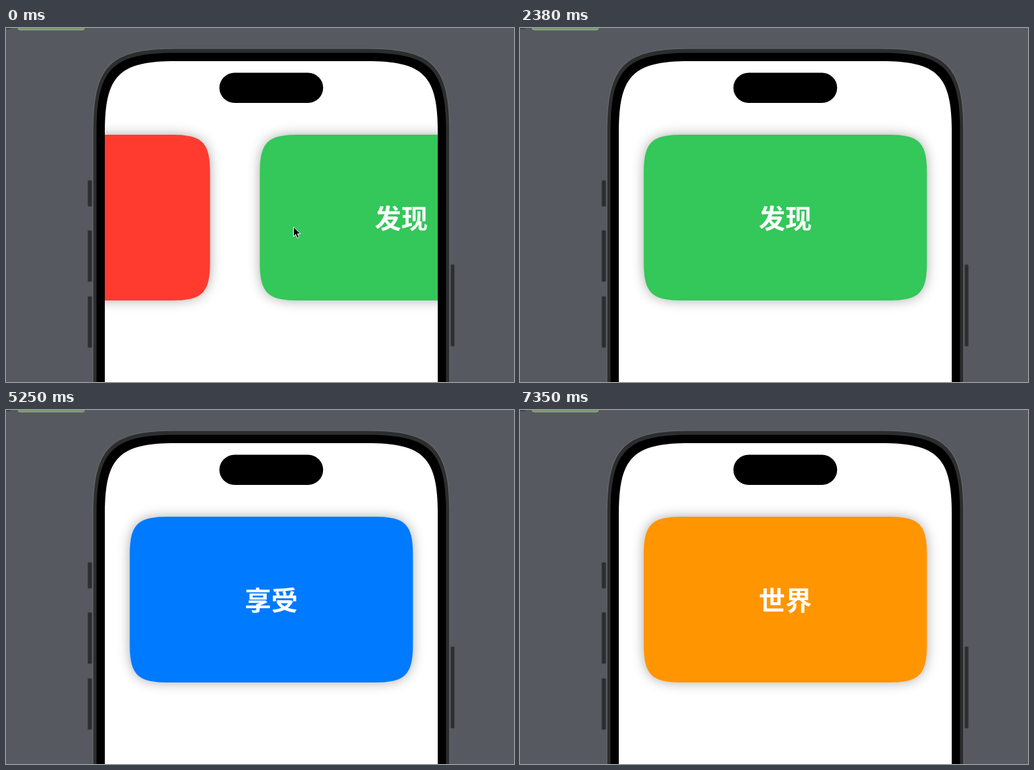
An HTML page for the animation above (8 s loop, 766 by 534 pixels).

```html
<!DOCTYPE html>
<html lang="zh-CN">
<head>
<meta charset="utf-8">
<style>
  html, body { margin: 0; width: 100%; height: 100%; overflow: hidden; background: #565a60; }
  svg { display: block; }
  .card path { filter: drop-shadow(0 0 9px rgba(0, 0, 0, .33)); }
  .card text { font: 700 40px "Noto Sans CJK SC", "Noto Sans CJK", "Noto Sans SC", sans-serif; fill: #fff; text-anchor: middle; }
</style>
</head>
<body>
<svg width="766" height="534" viewBox="0 0 766 534">
  <defs><clipPath id="screen"><path id="clip"/></clipPath></defs>
  <rect x="-4" y="-4" width="12" height="5.5" rx="2" fill="#35393c"/>
  <rect x="18.5" y="-8" width="99.5" height="11" rx="2.5" fill="#789a6c" stroke="#a3b99b" stroke-width=".8"/>
  <g fill="#2b2d2f" stroke="#3b3e41" stroke-width=".8">
    <rect x="123.4" y="230" width="6" height="39" rx="1"/>
    <rect x="123.4" y="305.5" width="6" height="77" rx="1"/>
    <rect x="123.4" y="405" width="6" height="77" rx="1"/>
    <rect x="670.8" y="357" width="5.2" height="123" rx="1"/>
  </g>
  <path id="frame" fill="#2c2d2e" stroke="#66696b" stroke-width="1.2"/>
  <path id="bezel"/>
  <path id="glass" fill="#fff"/>
  <g clip-path="url(#screen)"><g id="strip"></g></g>
  <rect x="321.8" y="67.5" width="156.4" height="45.5" rx="22.75"/>
  <path id="cursor" d="M433.5 300v14.5l3.3-3.1 2.4 5.5 2.7-1.1-2.4-5.4h4.6z" stroke="#fff" stroke-width="1"/>
</svg>
<script>
const LOOP = 8000, STEP = 70, PITCH = 502, RESET = 1190;
const OMEGA = 2 * Math.PI / 0.4;
const STARTS = [1962, 3984, 6081];
const CARDS = [['欢迎', '#ff3b30'], ['发现', '#34c759'], ['享受', '#007aff'], ['世界', '#ff9500']];
const $ = id => document.getElementById(id);

// Rectangle with continuous corners that reach e along each side
function squircle(x, y, w, h, e) {
  const k = e * 0.2, r = x + w, b = y + h;
  return `M${x + e} ${y}H${r - e}C${r - k} ${y} ${r} ${y + k} ${r} ${y + e}` +
    `V${b - e}C${r} ${b - k} ${r - k} ${b} ${r - e} ${b}` +
    `H${x + e}C${x + k} ${b} ${x} ${b - k} ${x} ${b - e}` +
    `V${y + e}C${x} ${y + k} ${x + k} ${y} ${x + e} ${y}Z`;
}

$('frame').setAttribute('d', squircle(131, 31, 538, 1000, 125));
$('bezel').setAttribute('d', squircle(136.5, 37.5, 527, 1000, 119));
for (const id of ['glass', 'clip']) $(id).setAttribute('d', squircle(149, 50, 502, 1000, 107));

$('strip').innerHTML = CARDS.map(([label, color], i) =>
  `<g class="card" transform="translate(${i * PITCH})">
    <path d="${squircle(186.6, 161, 427, 250, 58)}" fill="${color}"/>
    <text x="400" y="302">${label}</text>
  </g>`).join('');

// Critically damped spring, 0 to 1
function spring(ms) {
  if (ms <= 0) return 0;
  if (ms > 410) return 1;
  const a = OMEGA * ms / 1000;
  return 1 - (1 + a) * Math.exp(-a);
}

function draw(now) {
  const t = Math.floor(now % LOOP / STEP) * STEP;
  const first = t < RESET;
  const page = first ? spring(t + 131) : STARTS.reduce((sum, s) => sum + spring(t - s), 0);
  $('strip').setAttribute('transform', `translate(${-page * PITCH})`);
  $('cursor').style.display = first ? '' : 'none';
}

const begin = performance.now();
function tick() {
  draw(performance.now() - begin);
  requestAnimationFrame(tick);
}
tick();
</script>
</body>
</html>
```
